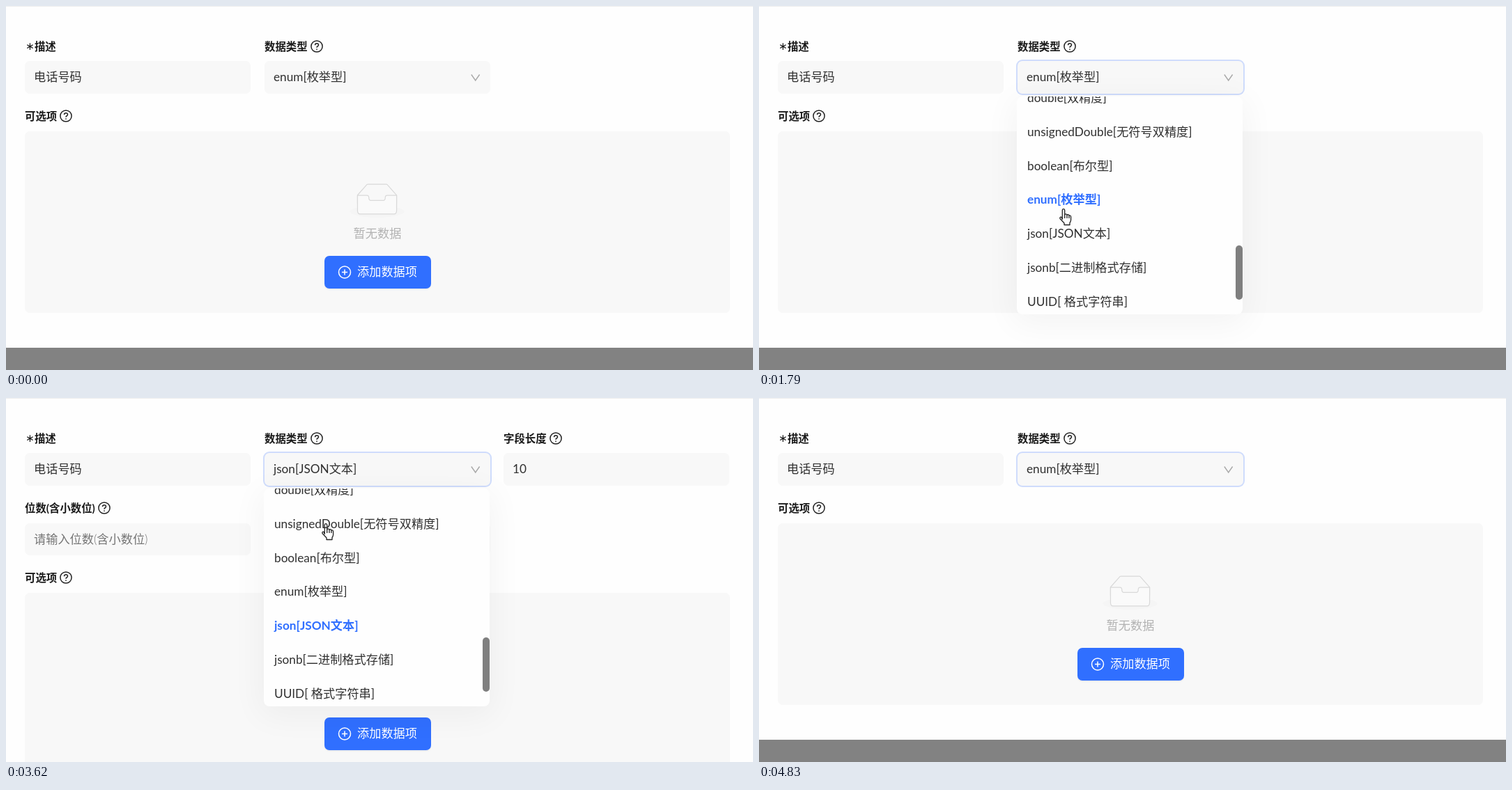
Write an HTML page that moves like this. It is 1072 by 523 pixels and loops after 5430 ms.

```html
<!DOCTYPE html>
<html lang="zh-CN">
<head>
<meta charset="utf-8">
<style>
html, body { margin: 0; width: 100%; height: 100%; overflow: hidden; background: #fefefe; }
#stage { position: relative; width: 1072px; height: 523px; overflow: hidden; background: #fefefe; border-top: 1px solid #eee; box-sizing: border-box;
  font: 300 17.2px/46px Lato, "Noto Sans CJK SC", "Noto Sans CJK", sans-serif; color: #303030; }
#stage * { box-sizing: border-box; }
#stage div, #stage svg { position: absolute; }
#scene { left: 0; top: -1px; width: 1072px; height: 523px; }
svg { overflow: visible; fill: none; }
.label { display: flex; align-items: center; height: 22px; line-height: 22px; font-size: 15.4px; font-weight: 700; color: #1a1a1a; white-space: pre; }
.label i { font: 15.4px "DejaVu Sans", sans-serif; }
#stage .label svg { position: static; margin: 0 0 0 4px; }
.field { width: 324px; height: 47px; padding-left: 13px; border-radius: 7px; background: #f8f8f8; white-space: nowrap; }
.hint { color: #757575; }
.latin { font-weight: 400; }
.focus { box-shadow: 0 0 0 2px #cfdcfc; }
.panel { left: 27px; top: 180px; width: 1012px; height: 261px; border-radius: 7px; background: #f8f8f8; }
.empty { left: 27px; top: 304px; width: 1012px; text-align: center; color: #b2b2b2; }
.button { left: 456.5px; top: 359px; width: 153px; height: 46.5px; padding-left: 47.5px; border-radius: 7px; background: #306fff; color: #fff; font-weight: 500; box-shadow: 0 2px 1px #0000000a; }
.shade { left: 0; top: 491px; width: 1072px; height: 40px; background: #828282; }
#lower { left: 0; top: 0; }
#menu { left: 370px; top: 130px; width: 324px; height: 313px; border-radius: 8px; background: #fefefe; box-shadow: 0 9px 46px 6px #0000000b; transform-origin: 0 2px; }
#list { inset: 0; overflow: hidden; border-radius: 8px; }
.option { left: 0; width: 324px; height: 48.9px; line-height: 48.9px; padding-left: 15px; white-space: pre; }
.option.chosen { color: #306fff; font-weight: 700; }
.thumb { left: 314px; top: 213.5px; width: 10px; height: 78.5px; border-radius: 5px; background: #7f7f7f; }
#spot { width: 29px; height: 29px; border-radius: 50%; background: #faee28c4; margin: -14px; }
</style>
</head>
<body>
<div id="stage"><div id="scene">
  <div class="label" style="left:28px;top:47px"><i>∗</i>描述</div>
  <div class="field" style="left:27px;top:79px">电话号码</div>
  <div class="label help" style="left:371px;top:47px">数据类型</div>
  <div class="field latin" id="select" style="left:371px;top:79px"></div>
  <svg style="left:667px;top:98px" width="14" height="10" stroke="#a8a8a8" stroke-width="1.4"><path d="M.8.5 6.7 9 12.6.5"/></svg>

  <div id="extra">
    <div class="label help" style="left:714px;top:47px">字段长度</div>
    <div class="field latin" style="left:714px;top:79px">10</div>
    <div class="label help" style="left:27px;top:147px">位数(含小数位)</div>
    <div class="field hint" style="left:27px;top:180px;height:46px">请输入位数(含小数位)</div>
    <div class="label help" style="left:371px;top:147px">小数位位数</div>
    <div class="field hint" style="left:371px;top:180px;height:46px">请输入小数位位数</div>
  </div>

  <div id="lower">
    <div class="label help" style="left:27px;top:147px">可选项</div>
    <div class="panel"></div>
    <svg style="left:493px;top:255px" width="79" height="50" viewBox="0 0 64 41" stroke="#d9d9d9">
      <ellipse cx="32" cy="33" rx="32" ry="7" fill="#f5f5f5" stroke="none"/>
      <path d="M55 13.8 44.9 2.3Q43.9 1 42.9 1H21.1Q20.1 1 19.1 2.3L9 13.8V23H55Z"/>
      <path fill="#fafafa" d="M41.6 17Q41.6 14 43.8 14H55V32Q55 36 52 36H12Q9 36 9 32V14H20.2Q22.4 14 22.4 17 22.4 19.9 24.6 19.9H39.4Q41.6 19.9 41.6 17Z"/>
    </svg>
    <div class="empty">暂无数据</div>
    <div class="button">添加数据项
      <svg style="left:19.5px;top:14px" width="20" height="20" stroke="#fff" stroke-width="1.5"><circle cx="10" cy="9.5" r="8.5"/><path d="M6 9.5h8M10 5.5v8"/></svg>
    </div>
    <div class="shade"></div>
  </div>

  <div id="menu"><div id="list"></div><div class="thumb"></div></div>
  <svg id="hand" width="18" height="25" fill="#fff" stroke="#222" stroke-width="1.3" stroke-linejoin="round">
    <path d="M4.3 15.5V2.3Q4.5.7 6 .7T7.7 2.3V9Q8.1 7.7 9.4 7.8T11 9.6Q11.4 8.4 12.6 8.7T14 10.5Q14.5 9.6 15.6 10T16.6 12V16.5Q16.5 18.5 15 20.5V23.5H7V21L1.2 14.8Q.3 13.4 1.3 12.5T3.3 13Z"/>
    <path d="M7.7 9v5M11 9.7v4.3M14 10.5V14"/>
  </svg>
  <svg id="arrow" width="13" height="19" fill="#fff" stroke="#222" stroke-width="1.2" stroke-linejoin="round">
    <path d="M.7.7V15L4.1 11.9 6.5 17.5 8.8 16.5 6.4 11.1H11Z"/>
  </svg>
  <div id="spot"></div>
</div></div>

<script>
const LOOP = 5430;
const OPTIONS = ["double[双精度]", "unsignedDouble[无符号双精度]", "boolean[布尔型]", "enum[枚举型]",
  "json[JSON文本]", "jsonb[二进制格式存储]", "UUID[ 格式字符串]"];
const ENUM = 3, JSON_TEXT = 4;
const $ = id => document.getElementById(id);

const HELP = `<svg width="18" height="18" stroke="#222" stroke-width="1.5"><circle cx="9" cy="9" r="8.1"/>
  <path d="M6.5 7.2Q6.6 4.8 9 4.8T11.5 7Q11.5 8.2 10 9 9 9.6 9 10.8M9 12.4v1.5"/></svg>`;
document.querySelectorAll(".help").forEach(label => label.insertAdjacentHTML("beforeend", HELP));

const rows = OPTIONS.map((text, i) => {
  const row = document.createElement("div");
  row.className = "option latin";
  row.textContent = text;
  row.style.top = -22.2 + i * 48.85 + "px";
  $("list").append(row);
  return row;
});

// Each step overrides the state left by the steps before it.
const START = { chosen: ENUM, tall: false, focus: false, menu: 0, hover: -1, tint: "#f8f8f8", pointer: "", x: 0, y: 0, spot: false };
const STEPS = [
  [990, { pointer: "hand", x: 412, y: 92 }],
  [1190, { menu: .36 }],
  [1390, { menu: 1, focus: true }],
  [1590, { x: 424, y: 205 }],
  [1790, { x: 431, y: 291 }],
  [1990, { x: 433, y: 315, hover: JSON_TEXT }],
  [2390, { spot: true }],
  [2590, { chosen: JSON_TEXT, tall: true, pointer: "arrow", x: 439, y: 315, tint: "#fcfcfc", spot: false }],
  [2800, { menu: 0, hover: -1, x: 443, y: 296 }],
  [3000, { x: 455, y: 180 }],
  [3220, { pointer: "hand", x: 461, y: 90, spot: true }],
  [3420, { menu: 1, spot: false }],
  [3620, { x: 453, y: 180 }],
  [3820, { x: 442, y: 270, hover: ENUM, tint: "#f8f8f8" }],
  [4020, { spot: true }],
  [4220, { chosen: ENUM, pointer: "arrow", x: 445, y: 270, spot: false }],
  [4430, { tall: false, menu: 0, hover: -1, pointer: "" }]
];

const show = (id, on) => $(id).style.display = on ? "" : "none";
const place = (id, x, y) => $(id).style.transform = `translate(${x}px, ${y}px)`;

function draw(s) {
  const label = OPTIONS[s.chosen];
  if ($("select").textContent !== label) $("select").textContent = label;
  $("select").classList.toggle("focus", s.focus);
  show("extra", s.tall);
  place("lower", 0, s.tall ? 100 : 0);
  show("menu", s.menu);
  $("menu").style.opacity = s.menu;
  $("menu").style.transform = s.menu < 1 ? "scaleY(.868)" : "none";
  rows.forEach((row, i) => {
    row.classList.toggle("chosen", i === s.chosen);
    row.style.background = i === s.hover ? s.tint : "none";
  });
  for (const id of ["hand", "arrow"]) {
    show(id, s.pointer === id);
    place(id, s.x, s.y);
  }
  show("spot", s.spot);
  place("spot", s.x + 5, s.y + 1);
}

function tick() {
  const t = performance.now() % LOOP;
  draw(Object.assign({}, START, ...STEPS.filter(([at]) => at <= t).map(([, change]) => change)));
  requestAnimationFrame(tick);
}
tick();
</script>
</body>
</html>
```
